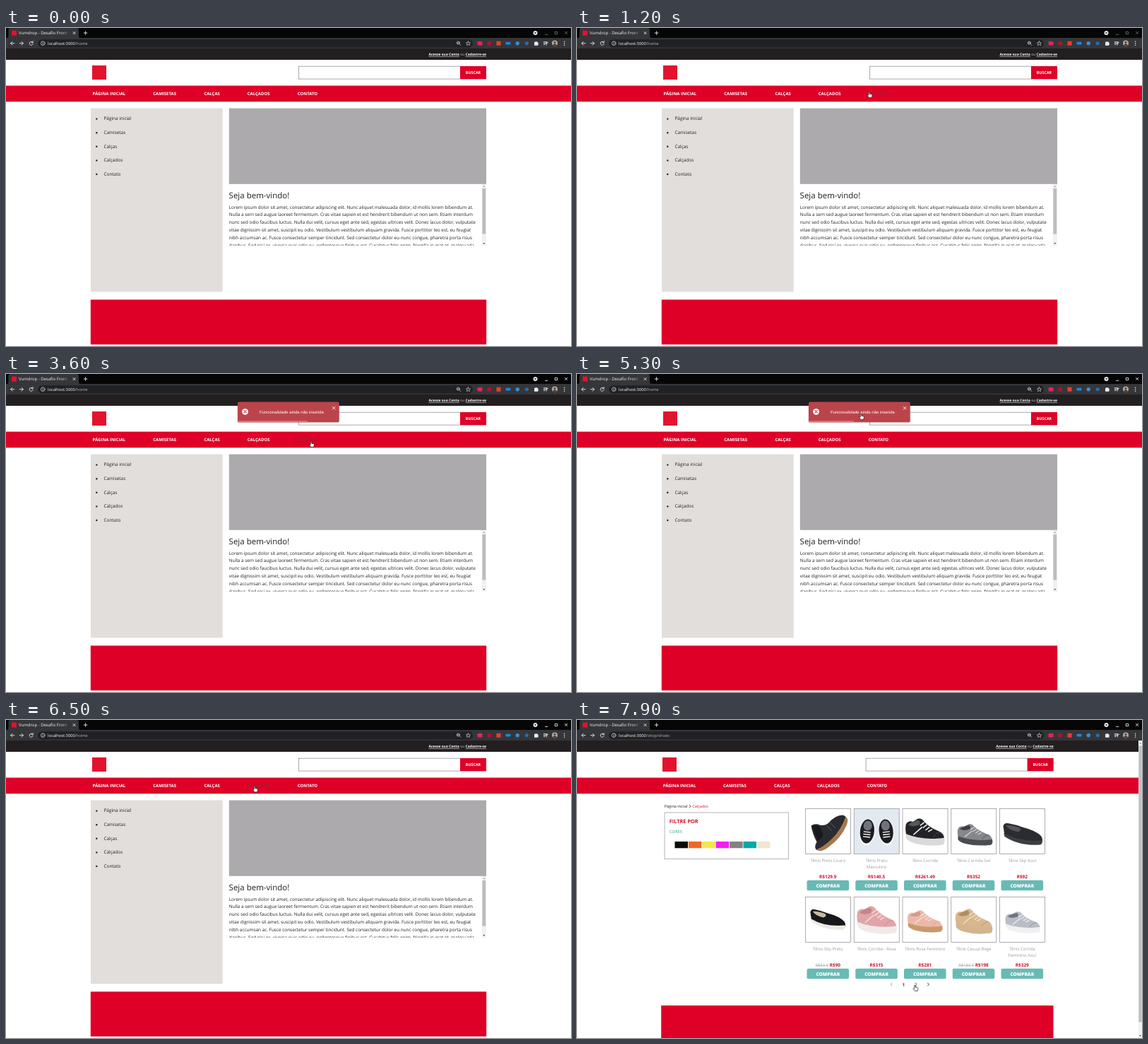
Write an HTML page that moves like this. It is 800x450 px and loops after 8000 ms.

```html
<!DOCTYPE html>
<html lang="pt-BR">
<head>
<meta charset="utf-8">
<title>Vumdrop - Desafio Front</title>
<style>
html, body { margin: 0; width: 100%; height: 100%; overflow: hidden; background: #fff; }
svg { display: block; width: 100vw; height: 100vh; }
text { font-family: "Open Sans", "Noto Sans", sans-serif; fill: #1c2024; text-rendering: geometricPrecision; white-space: pre; }
.b { font-weight: 700; }
.x { font-weight: 800; }
.w { fill: #fff; }
.r { fill: #d3112f; }
.g { fill: #9c9c9c; }
.m { text-anchor: middle; }
.e { text-anchor: end; }
.u { text-decoration: underline; }
.s { text-decoration: line-through; }
.sans { font-family: "Liberation Sans", Arial, sans-serif; }
.line { fill: none; stroke: #e8eaed; stroke-width: .9; stroke-linecap: round; stroke-linejoin: round; }

.home, .shop, .win, .contact, .shoes, .arrow, .hand { animation: 8s step-end infinite; }
.home { animation-name: home; }
.shop { animation-name: shop; }
.win { animation-name: win; }
.contact { animation-name: contact; }
.shoes { animation-name: shoes; }
.arrow { animation-name: arrow; }
.hand { animation-name: hand; }
.cursor { animation: cursor 8s ease-in-out infinite; }
.toast { animation: toast 8s infinite; }
.bar { animation: bar 8s linear infinite; transform-origin: 328px 0; }

@keyframes home { 0% { visibility: visible } 82.5%, 100% { visibility: hidden } }
@keyframes shop { 0% { visibility: hidden } 82.5%, 100% { visibility: visible } }
@keyframes win { 0% { opacity: .45 } 23.75%, 100% { opacity: 1 } }
@keyframes contact { 0% { fill: #fff } 14.5% { fill: #ad1a2e } 53.6%, 100% { fill: #fff } }
@keyframes shoes { 0% { fill: #fff } 76.6%, 100% { fill: #ad1a2e } }
@keyframes arrow {
  0% { opacity: 1 } 14.5% { opacity: 0 } 53.6% { opacity: 1 } 57.5% { opacity: 0 }
  70% { opacity: 1 } 76.6% { opacity: 0 } 82.5% { opacity: 1 } 97.4%, 100% { opacity: 0 }
}
@keyframes hand {
  0% { opacity: 0 } 14.5% { opacity: 1 } 53.6% { opacity: 0 } 57.5% { opacity: 1 }
  70% { opacity: 0 } 76.6% { opacity: 1 } 82.5% { opacity: 0 } 97.4%, 100% { opacity: 1 }
}
@keyframes cursor {
  0%, 7.5% { transform: translate(500px, 460px) }
  15% { transform: translate(413.5px, 90px) }
  20%, 51.9% { transform: translate(432px, 95px) }
  61.25%, 66.9% { transform: translate(402px, 56px) }
  77.5%, 82.5% { transform: translate(352px, 93.5px) }
  90%, 91.9% { transform: translate(415.5px, 327px) }
  98.75%, 100% { transform: translate(478.5px, 375px) }
}
@keyframes toast {
  0%, 26% { transform: translateY(-1350px); opacity: 0; animation-timing-function: cubic-bezier(.215, .61, .355, 1) }
  31.25% { transform: translateY(11px); opacity: 1; animation-timing-function: cubic-bezier(.215, .61, .355, 1) }
  32.56% { transform: translateY(-4.5px) }
  33.88% { transform: translateY(2.2px) }
  34.75%, 66.6% { transform: none; opacity: 1 }
  68.4% { transform: translateY(-4.5px) }
  70.1%, 70.56% { transform: translateY(9px); opacity: 1 }
  75.4%, 100% { transform: translateY(-900px); opacity: 0 }
}
@keyframes bar { 0%, 26% { transform: scaleX(.993) } 60%, 100% { transform: scaleX(.4476) } }
</style>
</head>
<body>
<svg id="stage" viewBox="0 0 800 450" preserveAspectRatio="none"></svg>
<script>
const RED = '#de0027', MENU = ['PÁGINA INICIAL', 'CAMISETAS', 'CALÇAS', 'CALÇADOS', 'CONTATO'];

const rect = (x, y, w, h, fill, more = '') => `<rect x="${x}" y="${y}" width="${w}" height="${h}" fill="${fill}" ${more}/>`;
const disc = (x, y, r, fill) => `<circle cx="${x}" cy="${y}" r="${r}" fill="${fill}"/>`;
const path = (d, fill, more = '') => `<path d="${d}" fill="${fill}" ${more}/>`;
const line = (d, more = '') => `<path class="line" d="${d}" ${more}/>`;
const text = (x, y, size, str, cls = '', more = '') =>
  `<text x="${x}" y="${y}" font-size="${size}" class="${cls}" ${more}>${str}</text>`;
const group = (cls, body) => `<g class="${cls}">${body}</g>`;

function browser() {
  const address = (cls, page) => group(cls, text(59, 23.8, 5.75,
    `localhost:3000<tspan fill="#b4b8bd">/${page}</tspan>`, '', 'style="fill:#fff"'));
  return rect(0, 0, 800, 14.5, '#060606')
    + path('M1 14.5Q3.5 14 3.5 11V3Q3.5 0 6 0H100Q103 0 103 3V11Q103 14 105.5 14.5Z', '#35363a')
    + rect(0, 14, 800, 15, '#35363a')
    + rect(8, 3.5, 7, 7, '#e3122e', 'rx=".8"')
    + text(18, 9.2, 6, 'Vumdrop - Desafio Front', '', 'style="fill:url(#fade)"')
    + line('M95 5.5l3.2 3.2m0-3.2l-3.2 3.2M110.3 7h4.6M112.6 4.7v4.6')
    + disc(749.5, 7, 3, '#e8eaed') + path('M748 6.2h3l-1.5 2z', '#111')
    + group('win', line('M763.5 9.3h3.4M777.6 5.4h3.2v3.2h-3.2zM791.5 5.2l3.2 3.2m0-3.2l-3.2 3.2'))
    + line('M11.8 21.7H6.6m2.4-2.4l-2.4 2.4 2.4 2.4M19.2 21.7h5.2m-2.4-2.4l2.4 2.4-2.4 2.4')
    + line('M37.8 20.4a2.5 2.5 0 1 0 .3 2M38.2 18.6v2h-2')
    + rect(45, 16.2, 616, 11.2, '#202124', 'rx="5.6"')
    + line('M52.2 21.4v1.8M52.2 19.9v.1', 'style="stroke-width:.7"')
    + `<circle class="line" cx="52.2" cy="21.7" r="2.8" style="stroke-width:.7"/>`
    + address('home', 'home') + address('shop', 'shop/shoes')
    + line('M642.2 22.8l1.6 1.6M639.4 21.1h1.8', 'style="stroke-width:.7"')
    + `<circle class="line" cx="640.3" cy="21.1" r="2" style="stroke-width:.7"/>`
    + line('M654.5 18.8l.9 2 2.2.2-1.7 1.4.6 2.2-2-1.2-2 1.2.6-2.2-1.7-1.4 2.2-.2z', 'style="stroke-width:.6"')
    + rect(667.5, 19, 7, 5.6, '#e2265c', 'rx="1.5"') + disc(684.3, 21.7, 3, '#b0122c')
    + rect(694.5, 18.7, 6, 6, '#e2402f') + rect(707.5, 19.8, 7, 3.8, '#1c86dd', 'rx="1"')
    + disc(724.2, 21.7, 2.7, '#3a8fd0') + disc(737.3, 21.7, 2.5, '#2d6da8')
    + path('M748 19.8h1.6a1.2 1.2 0 0 1 2.2 0h1.5v1.6a1.2 1.2 0 0 1 0 2.2v1.2H748z', '#e8eaed')
    + line('M761.3 19.7h4.6M761.3 21.5h4.6M761.3 23.3h2.3M765.4 24v-3.5h1.8')
    + disc(777, 21.5, 4, '#b8a79b') + disc(777, 20.4, 1.4, '#4c3934') + path('M774 24.2q3-4 6 0-3 2.6-6 0z', '#4c3934')
    + [19.2, 21.7, 24.2].map(y => disc(790.6, y, .75, '#e8eaed')).join('');
}

// Page header, shared by both pages; the page's scrollbar shifts it.
function header(width, left, right, tabs, hover = []) {
  const box = right - 265.6;
  return rect(0, 29, width, 421, '#fff') + rect(0, 29, width, 16, '#231f20')
    + text(right, 39, 5.04, '<tspan class="b u">Acesse sua Conta</tspan><tspan fill="#bbb"> ou </tspan><tspan class="b u">Cadastre-se</tspan>', 'w e')
    + rect(left + 2, 53, 20, 20, '#e3122e')
    + rect(box, 54.2, 229, 17.9, '#fff', 'stroke="#85858d" stroke-width=".7"')
    + rect(right - 37, 54, 37, 18.4, RED) + text(right - 18.5, 65, 5.4, 'BUSCAR', 'b w m')
    + rect(0, 81.6, width, 22.7, RED)
    + MENU.map((label, i) => text(tabs[i], 95.3, 6, label, 'b w ' + (hover[i] || ''))).join('');
}

function home() {
  const items = ['Página inicial', 'Camisetas', 'Calças', 'Calçados', 'Contato'];
  const lorem = [
    'Lorem ipsum dolor sit amet, consectetur adipiscing elit. Nunc aliquet malesuada dolor, id mollis lorem bibendum at.',
    'Nulla a sem sed augue laoreet fermentum. Cras vitae sapien et est hendrerit bibendum ut non sem. Etiam interdum',
    'nunc sed odio faucibus luctus. Nulla dui velit, cursus eget ante sed, egestas ultrices velit. Donec lacus dolor, vulputate',
    'vitae dignissim sit amet, suscipit eu odio. Vestibulum vestibulum aliquam gravida. Fusce porttitor leo est, eu feugiat',
    'nibh accumsan ac. Fusce consectetur semper tincidunt. Sed consectetur dolor eu nunc congue, pharetra porta risus',
    'dapibus. Sed nisi ex, viverra quis odio eu, pellentesque finibus est. Curabitur felis enim, fringilla in erat et, malesuada'];
  return header(800, 120, 680, [122.6, 208.2, 280.4, 341.8, 412.8], ['', '', '', 'shoes', 'contact'])
    + rect(120, 113.6, 186.7, 259.7, '#e2dedb')
    + items.map((s, i) => disc(128.3, 128.6 + i * 19.6, 1.2, '#212529') + text(138.5, 130.3 + i * 19.6, 6.42, s)).join('')
    + rect(315.8, 113.6, 364.2, 107.2, '#acaaac')
    + text(315.6, 241.2, 11.5, 'Seja bem-vindo!')
    + `<g clip-path="url(#panel)">` + lorem.map((s, i) => text(315.8, 255.5 + i * 10.8, 6.42, s)).join('') + '</g>'
    + rect(673.7, 221, 6.3, 87, '#f1f1f1') + rect(674.4, 227, 4.8, 64.5, '#bdbdbd')
    + path('M675.3 225l1.5-2 1.5 2z', '#a0a0a0') + path('M675.3 304l1.5 2 1.5-2z', '#505050')
    + rect(119.8, 384.4, 560.4, 63.4, RED);
}

// Side views are drawn 60 by 36, then fitted to the given place in the photo.
const place = (x, y, w, h, body) => `<g transform="translate(${x} ${y}) scale(${w / 60} ${h / 36})">${body}</g>`;

const sneaker = (x, y, w, h, upper, sole, trim, lining) => place(x, y, w, h,
  path('M2 8Q6 3 12 5L20 1Q26 0 29 5Q38 13 50 17Q59 20 59 28L57 31Q30 31 3 24Q0 16 2 8Z', upper)
  + path('M2 21Q28 30 59 26Q61 32 57 35Q34 38 14 33Q4 30 2 26Z', sole)
  + path('M5 9Q10 5 20 3Q24 4 22 9Q12 13 5 9Z', lining)
  + path('M23 10l6-4M27 13l6-4M31 16l6-4M35 18l6-3M13 22L26 12', 'none', `stroke="${trim}" stroke-width="1.5"`)
  + path('M42 26Q46 19 54 19', 'none', `stroke="${lining}" stroke-width=".7"`));

const loafer = (x, y, w, h, upper, sole, lining) => place(x, y, w, h,
  path('M1 6Q3 0 9 2Q20 4 30 8Q50 13 58 22Q61 28 58 32Q30 34 3 20Z', upper)
  + path('M2 17Q26 31 59 28Q60 34 56 35Q24 37 3 22Z', sole)
  + path('M5 5Q14 4 26 9Q29 13 23 15Q10 13 5 5Z', lining));

const pair = () => rect(0, 0, 64, 64, '#e3e9f0') + [18.5, 45.5].map((x, i) =>
  `<g transform="rotate(${i ? -6 : 6} ${x} 33)"><ellipse cx="${x}" cy="33" rx="11" ry="19" fill="#fafafa"/>`
  + `<ellipse cx="${x}" cy="32" rx="10" ry="17" fill="#1c1d22"/><ellipse cx="${x}" cy="24" rx="6" ry="7" fill="#70737b"/>`
  + path(`M${x - 5} 33h10m-10 3.5h10m-10 3.5h10`, 'none', 'stroke="#fff" stroke-width="1.3"') + '</g>').join('');

const derby = () =>
  path('M8 24Q14 20 20 23Q27 25 33 20Q42 9 53 9Q60 11 57 20Q49 38 31 52Q22 60 15 58Q12 54 16 47Q10 36 8 24Z', '#292b30')
  + path('M15 58Q26 54 38 42Q51 29 57 11Q62 15 58 24Q50 42 33 54Q22 63 15 58Z', '#a47a4e')
  + path('M9 25Q14 22 20 25L25 37Q22 44 17 45Z', '#17181b')
  + path('M30 24l7 7M35 20l7 7', 'none', 'stroke="#5a5c64" stroke-width="1"');

function card([name, price, art, old], i) {
  const x = 323.5 + i % 5 * 68.75, y = 125.5 + (i > 4) * 125, mid = x + 31.8;
  const cost = old ? `<tspan class="s" font-size="5.8" style="font-weight:400;fill:#a5a5a5">${old}</tspan><tspan dx="1.8">${price}</tspan>` : price;
  return `<g transform="translate(${x} ${y})">${art}</g>` + rect(x, y, 64, 64, 'none', 'stroke="#9a9a9e" stroke-width=".8"')
    + name.split('|').map((s, n) => text(mid, y + 75.3 + n * 8.9, 6, s, 'g m')).join('')
    + text(mid, y + 98.8, 6.45, cost, 'b r m')
    + rect(x + 2, y + 101.3, 59.6, 14.5, '#68bab4', 'rx="2.6"')
    + text(mid, y + 111, 6.6, 'COMPRAR', 'x w m');
}

function shop() {
  const colors = ['#0b0b0b', '#f26526', '#f0e950', '#f81ef0', '#828282', '#00a8a8', '#f6eee2'];
  const cards = [
    ['Tênis Preto Couro', 'R$129.9', derby()],
    ['Tênis Preto|Masculino', 'R$140.5', pair()],
    ['Tênis Corrida', 'R$261.49', sneaker(3, 13, 57, 39, '#222326', '#dadada', '#f0f0f0', '#55575c')],
    ['Tênis Corrida Gel', 'R$352', sneaker(8, 21, 51, 31, '#85878a', '#4b4c50', '#d5d7d9', '#3c3e42')],
    ['Tênis Slip Azul', 'R$92', loafer(4, 19, 57, 33, '#2b2c31', '#3d3e43', '#57545a')],
    ['Tênis Slip Preto', 'R$90', loafer(6, 16, 51, 31, '#17181b', '#ece9e4', '#c9b9a4'), 'R$53.9'],
    ['Tênis Corrida - Rosa', 'R$315', sneaker(3, 12, 58, 40, '#e0a5a8', '#f0eae9', '#f6dcdb', '#c58588')],
    ['Tênis Rosa Feminino', 'R$281', sneaker(6, 18, 51, 32, '#ebb9a8', '#c79a6c', '#f5e0d8', '#d49a8a')],
    ['Tênis Casual Bege', 'R$198', sneaker(5, 16, 54, 36, '#d8b78f', '#d2b48d', '#f1e2cd', '#b08c62'), 'R$183.9'],
    ['Tênis Corrida|Feminino Azul', 'R$329', sneaker(7, 20, 51, 31, '#b9bdc5', '#eff0f2', '#eef0f2', '#6f7682')]];
  return header(795, 119, 674.7, [121.7, 207, 279, 340, 410.8])
    + text(123.8, 124.4, 5.45, 'Página inicial') + line('M159.2 120.3l1.8 1.9-1.8 1.9', 'style="stroke:#333"')
    + text(163.3, 124.4, 5.45, 'Calçados', 'r')
    + rect(124, 131, 175.5, 65.7, '#fff', 'stroke="#a2a2a6" stroke-width=".8"')
    + text(130.8, 146.3, 7.35, 'FILTRE POR', 'b r')
    + text(130.8, 160, 5.8, 'CORES', '', 'style="fill:#5fb8b0;font-weight:600"')
    + colors.map((c, i) => rect(138.5 + i * 19.4, 172, 18.5, 9.3, c)).join('')
    + [1, 6].map(i => rect(138.5 + i * 19.4, 172, 18.5, 9.3, 'url(#weave)')).join('')
    + cards.map(card).join('')
    + line('M446 372.2l-1.9 1.9 1.9 1.9', 'style="stroke:#999"') + line('M496.5 372.2l1.9 1.9-1.9 1.9', 'style="stroke:#222"')
    + text(462.3, 376.5, 6.5, '1', 'b r m') + text(479.6, 376.5, 6.5, '2', 'm')
    + rect(119.2, 404, 555.3, 46, RED)
    + rect(795, 29, 5, 421, '#f1f1f1') + rect(795.4, 36.5, 4.2, 391, '#bfbfc1')
    + path('M796 33.5l1.5-2 1.5 2z', '#888') + path('M796 446l1.5 2 1.5-2z', '#505050');
}

function toast() {
  return rect(327.3, 39.7, 145.4, 30, '#000', 'rx="3" opacity=".1"')
    + rect(328, 39.5, 143.7, 28.7, '#bb444b', 'rx="2"')
    + rect(328, 66.2, 143.7, 2, '#e0747a', 'class="bar" rx=".5"')
    + disc(338.6, 53.3, 4.4, '#fff') + line('M337 51.7l3.2 3.2m0-3.2l-3.2 3.2', 'style="stroke:#bb444b;stroke-width:1.2"')
    + text(404.4, 55.6, 5.98, 'Funcionalidade ainda não inserida', 'sans w m')
    + line('M462.2 46.3l3.8 3.8m0-3.8l-3.8 3.8', 'style="stroke:#fff"');
}

function cursor() {
  const edge = 'stroke="#111" stroke-width=".7" stroke-linejoin="round"';
  return group('arrow', path('M0 0V8.2L1.9 6.5 3.2 9.3 4.5 8.7 3.2 6H5.8Z', '#111', 'stroke="#fff" stroke-width=".6"'))
    + group('hand', path('M-.8 .6Q0-.5.8.6V3.2L3.8 3.8Q4.5 4 4.4 4.9L3.8 8.4H-.2L-2.3 5.4Q-2.4 4.4-1.4 4.7L-.8 5.2Z', '#fff', edge));
}

document.getElementById('stage').innerHTML = `<defs>
  <clipPath id="panel"><rect x="315" y="221" width="358" height="87"/></clipPath>
  <linearGradient id="fade" gradientUnits="userSpaceOnUse" x1="78" x2="91" y1="0" y2="0">
    <stop stop-color="#f4f5f6"/><stop offset="1" stop-color="#35363a"/></linearGradient>
  <pattern id="weave" width="2" height="2" patternUnits="userSpaceOnUse" patternTransform="rotate(35)">
    <rect width="2" height=".8" fill="#c08a3a" opacity=".22"/></pattern></defs>`
  + browser() + group('home', home()) + group('shop', shop()) + group('toast', toast()) + group('cursor', cursor());
</script>
</body>
</html>
```
